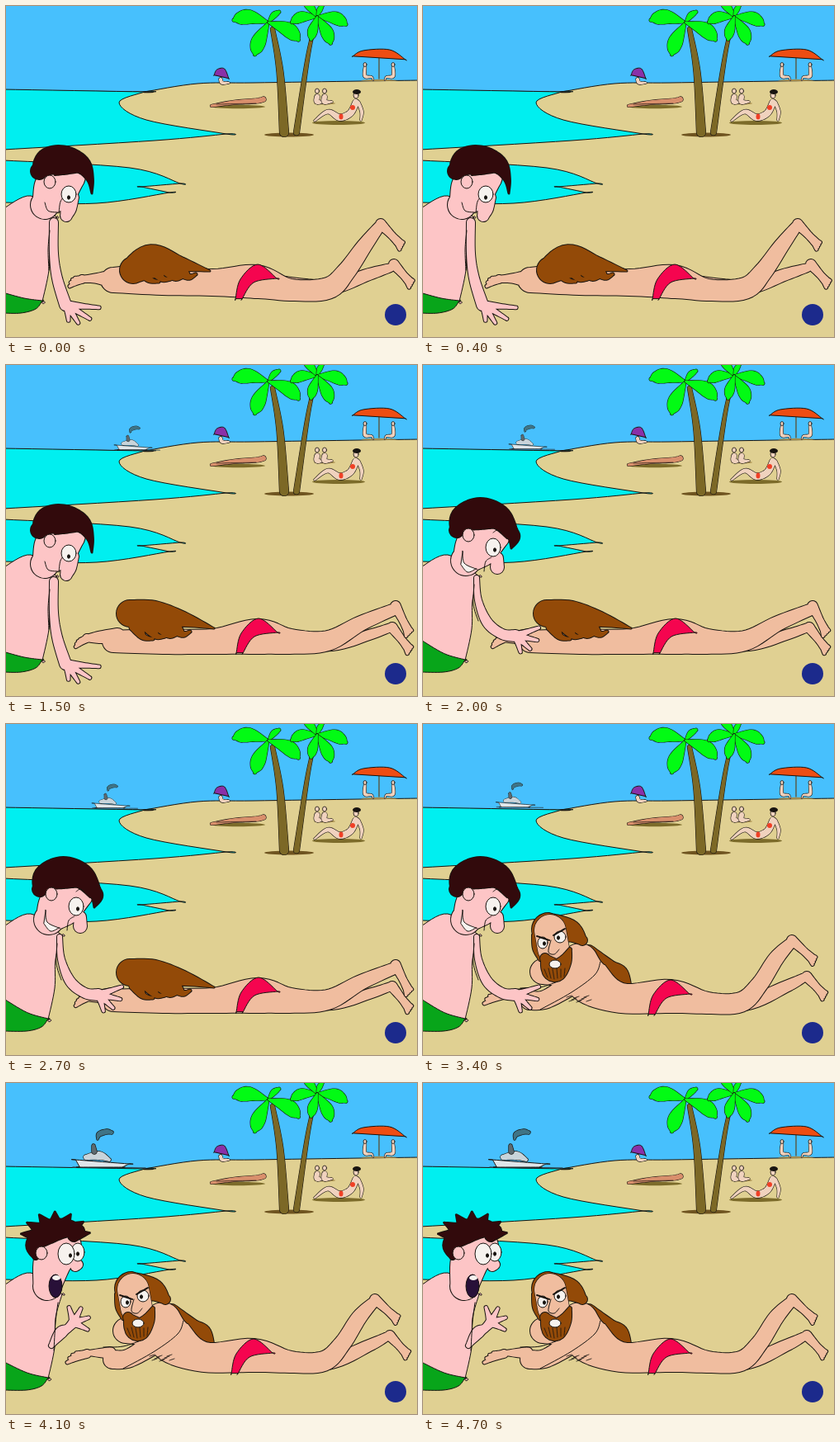
Write an HTML page that moves like this. It is 498 by 401 pixels and loops after 4800 ms.

```html
<!DOCTYPE html>
<html lang="en">
<head>
<meta charset="utf-8">
<title>Beach surprise</title>
<style>
  html, body { margin: 0; width: 100%; height: 100%; overflow: hidden; }
  svg { display: block; width: 100%; height: 100%; }
  path, ellipse { stroke: #181410; stroke-linejoin: round; stroke-linecap: round; }
</style>
</head>
<body>
<svg id="stage" viewBox="0 0 498 401" preserveAspectRatio="none"></svg>
<script>
const stage = document.getElementById('stage');
const SKIN = '#fdc5c6', TAN = '#f0bd9f', HAIR = '#934a08', DARK = '#320a0c', PALE = '#f0d2be';
const RED = '#f5054f', GREEN = '#08a51a', LEAF = '#02fb14', SAND = '#e0d092', SEA = '#00eff0';
const TRUNK = '#7c6826', TOWEL = '#7c6b2a';

function add(parent, tag, attrs = {}) {
  const el = document.createElementNS('http://www.w3.org/2000/svg', tag);
  for (const k in attrs) el.setAttribute(k, attrs[k]);
  return parent.appendChild(el);
}
const group = transform => add(stage, 'g', transform ? { transform } : {});
const range = n => [...Array(n).keys()];
const parse = text => text.trim().split(/\s+/).map(s => s.split(',').map(parseFloat));

// Point on a smooth curve through the key points
function spline(keys, i, t) {
  const at = n => keys[Math.max(0, Math.min(keys.length - 1, n))];
  const [a, b, c, d] = [-1, 0, 1, 2].map(n => at(i + n));
  return b.map((_, k) => b[k] + t * (c[k] - a[k] + t * (2 * a[k] - 5 * b[k] + 4 * c[k] - d[k]
    + t * (3 * b[k] - a[k] - 3 * c[k] + d[k]))) / 2);
}
function trace(keys, steps = 8) {
  const inner = range((keys.length - 1) * steps).map(n => spline(keys, Math.floor(n / steps), n % steps / steps));
  return [...inner, keys.at(-1)];
}

// Rounded tube along key points "x,y,radius"
function tube(text) {
  const p = trace(parse(text)), n = p.length - 1;
  const side = s => p.map(([x, y, r], i) => {
    const [ax, ay] = p[Math.max(i - 1, 0)], [bx, by] = p[Math.min(i + 1, n)];
    const h = s * Math.max(r, 0) / (Math.hypot(bx - ax, by - ay) || 1);
    return [x - (by - ay) * h, y + (bx - ax) * h];
  });
  const left = side(1), right = side(-1).reverse();
  const cap = (r, to) => `A${r} ${r} 0 0 0 ${to}`;
  return `M${left.join('L')}${cap(p[n][2], right[0])}L${right.join('L')}${cap(p[0][2], left[0])}Z`;
}

// Several tubes merged inside one outline
function blob(g, fill, tubes, width = 1) {
  const d = tubes.join('');
  add(g, 'path', { d, fill, 'stroke-width': width * 2 });
  add(g, 'path', { d, fill, style: 'stroke:none' });
}
// Area whose corners are marked with "!"
function area(g, fill, text) {
  const keys = text.trim().split(/\s+/).flatMap(s => s.endsWith('!') ? [s, s] : [s]);
  add(g, 'path', { d: `M${trace(parse(keys.join(' '))).join('L')}Z`, fill });
}
const line = (g, text, width = 1, color = '#181410') =>
  add(g, 'path', { d: 'M' + trace(parse(text)).join('L'), fill: 'none', style: `stroke:${color};stroke-width:${width}` });
const oval = (g, fill, cx, cy, rx, ry = rx, width = 1) =>
  add(g, 'ellipse', { cx, cy, rx, ry, fill, style: width ? `stroke-width:${width}` : 'stroke:none' });

// Local frame: along the given direction and across it
function frame(x, y, deg) {
  const c = Math.cos(deg * Math.PI / 180), s = Math.sin(deg * Math.PI / 180);
  return (u, v, r) => `${x + u * c - v * s},${y + u * s + v * c},${r}`;
}
function hand(x, y, deg, len, spread, drop = .17) {
  return range(4).map(i => {
    const f = frame(x, y, deg + spread * (i / 3 - .5)), reach = len * (1 - drop * i);
    return tube(`${f(0, 0, 5)} ${f(reach * .5, 0, 3)} ${f(reach, 0, 1.8)}`);
  });
}
function foot(x, y, deg, len) {
  const f = frame(x, y, deg);
  const toes = range(4).map(i => tube(`${f(len - 6, 3 - i * 2, 2)} ${f(len - i, 5 - i * 3, 1.8)}`));
  return [tube(`${f(0, 0, 6)} ${f(len * .5, 0, 4.5)} ${f(len - 7, 0, 5)}`), ...toes];
}
function leaf(x, y, deg, len) {
  const f = frame(x, y, deg), lift = Math.cos(deg * Math.PI / 180) * -len * .12;
  return tube(`${f(0, 0, 1)} ${f(len * .55, lift, len * .2)} ${f(len * .85, lift / 2, len * .17)} ${f(len, 0, 2)}`);
}
function eye(g, x, y, rx, ry, dx, dy) {
  oval(g, '#f6f2ee', x, y, rx, ry);
  oval(g, '#181410', x + dx, y + dy, 1.5, 2.2);
}

function drawCoast() {
  const g = group();
  add(g, 'path', { d: 'M-2-2H500V110H-2Z', fill: '#47c0fd' });
  area(g, SAND, '-3,102! 168,104! 232,94 300,93 430,91 502,90! 502,405! -3,405!');
  area(g, SEA, '-3,101! 168,104! 137,117 170,138 267,155! 180,163 -3,174!');
  area(g, SEA, '-3,187! 150,196 211,215! 164,219! 198,226! 110,239 -3,238!');
}

function drawPalms() {
  const g = group();
  oval(g, '#6f5420', 343, 156, 30, 2.5, 0);
  blob(g, TRUNK, [tube('323,28,2.5 332,80,4 337,153,5.5')], .6);
  blob(g, TRUNK, [tube('377,12,1.5 366,60,2.2 352,153,3.5')], .6);
  const fans = [
    [318, 20, [[184, 42], [113, 42], [-45, 18], [30, 42]]],
    [377, 13, [[168, 31], [-133, 22], [-65, 15], [15, 36], [63, 36], [105, 28]]]
  ];
  for (const [x, y, leaves] of fans)
    for (const [deg, len] of leaves) blob(g, LEAF, [leaf(x, y, deg, len)], .6);
}

function parasol(g, x, y, size, color) {
  line(g, `${x},${y} ${x},${y + size}`, 1.2, '#5d4420');
  area(g, color, `${x - size},${y + 5}! ${x - size * .6},${y - 2} ${x + size * .4},${y - 3} ${x + size},${y + 9}!`);
}

function drawBathers() {
  const g = group();
  oval(g, '#a08b50', 452, 90, 22, 1.2, 0);
  for (const side of [-1, 1]) {
    const x = 452 + side * 17;
    blob(g, PALE, [tube(`${x},74,1.5 ${x},85,2 ${x - side * 8},86,1 ${x - side * 10},90,.5`)], .6);
    oval(g, PALE, x, 71, 2, 2.5, .8);
  }
  parasol(g, 452, 56, 32, '#ee4d12');
  parasol(g, 261, 79, 9, '#8a30a8');
  blob(g, PALE, [tube('260,89,2 262,93,2 270,93,1')], .6);

  oval(g, TOWEL, 281, 122, 33, 2.2, 0);
  blob(g, '#d98f6c', [tube('249,121,1.5 275,117,2.5 303,115,3 312,113,3')], .6);
  line(g, '255,119 303,118', .7);

  oval(g, '#a88d4c', 386, 118, 13, 1.4, 0);
  for (const x of [377, 386]) {
    blob(g, PALE, [tube(`${x},110,3 ${x},116,3 ${x + 9},116,1`)], .6);
    oval(g, PALE, x, 103, 2.5, 3, .8);
  }

  oval(g, TOWEL, 403, 141.5, 32, 2.4, 0);
  blob(g, PALE, [tube('374,139,1 390,128,2.5 404,135,4 417,130,4 424,117,4'), tube('427,117,2 431,128,2 430,138,1')], .6);
  oval(g, '#f04026', 406, 134, 2.5, 3.5, 0);
  oval(g, '#f04026', 420, 123, 3, 3, 0);
  oval(g, PALE, 424, 108, 3, 4, .8);
  oval(g, '#181410', 425, 104, 5, 3, 0);
}

function boat(x, y, size) {
  const g = group(`translate(${x} ${y}) scale(${size})`);
  line(g, '-34,1 54,2', 1.4, '#2c4a58');
  area(g, '#dfe6ea', '-31,-8! 34,-3! 26,1! -26,1!');
  blob(g, '#c9d4da', [tube('-18,-11,3 -2,-13,5 10,-8,2')], .7);
  blob(g, '#5d6a70', [tube('-9,-25,2 -8,-18,3')], .7);
  blob(g, '#3f7486', [tube('-4,-33,1 -2,-39,3 7,-42,3 13,-41,2')], .7);
  return g;
}

function briefs(g, dx, dy) {
  const k = add(g, 'g', { transform: `translate(${dx} ${dy})` });
  area(k, RED, '278,355! 284,331 305,313 328,330! 300,335 286,355!');
}
function longHair(g, main, x, y) {
  const locks = range(4).map(i =>
    tube(`${x + 15 * i},${y},9 ${x + 8 + 16 * i},${y + 13 - i},4 ${x + 20 + 15 * i},${y + 16 - i * 3},1.5`));
  blob(g, HAIR, [tube(main), ...locks]);
}

function sleeper() {
  const g = group();
  blob(g, TAN, [tube('330,336,9 390,341,9 440,325,7 466,317,5'), ...foot(470, 313, 48, 33)]);
  blob(g, TAN, [
    tube('130,332,15 190,331,19 250,335,16 303,334,20 345,344,13 390,342,13 412,322,11 434,291,9 454,265,6'),
    tube('135,331,13 110,330,6 92,331,4'), ...hand(92, 331, 170, 17, 40), ...foot(454, 264, 46, 38)]);
  briefs(g, 0, 0);
  longHair(g, '154,320,16 178,309,20 212,313,9 247,321,.5', 165, 318);
  return g;
}

function stretched() {
  const g = group();
  blob(g, TAN, [tube('330,335,9 395,339,7 440,327,6 466,318,5'), ...foot(468, 318, 52, 36)]);
  blob(g, TAN, [
    tube('130,335,13 190,335,15 250,335,15 305,329,21 345,335,15 390,334,12 430,313,9 468,297,7'),
    tube('135,328,9 112,330,7 98,331,4'), ...hand(98, 331, 155, 17, 25), ...foot(472, 292, 63, 38)]);
  briefs(g, 1, -6);
  longHair(g, '150,301,16 180,302,16 215,308,9 252,319,.5', 158, 316);
  return g;
}

function bearded() {
  const g = group();
  blob(g, HAIR, [tube('200,278,10 225,297,11 240,303,9 252,318,.5')]);
  blob(g, TAN, [tube('325,335,9 390,338,9 440,318,7 462,307,5'), ...foot(465, 306, 47, 33)]);
  blob(g, TAN, [
    tube('190,288,22 202,312,27 240,332,18 300,330,20 345,338,13 385,337,12 408,315,10 428,284,9 447,264,6'),
    tube('145,300,15 190,298,22'), tube('185,312,13 150,333,11 129,335,11'),
    tube('126,327,7 100,327,3'), ...hand(98, 328, 170, 26, 28), ...foot(447, 262, 42, 38)]);
  briefs(g, -5, -3);
  line(g, '215,288 208,304 180,325 142,346');
  line(g, '118,320 142,319 166,311');
  for (const i of range(9)) {
    const x = 174 + i * 3, y = 331 + i * 5 % 7;
    line(g, `${x},${y} ${x + 6},${y - 2}`, .9);
  }
  blob(g, HAIR, [tube('152,249,20 178,251,14 193,262,6'), tube('134,256,2 136,272,3 142,285,2')]);
  blob(g, TAN, [tube('154,250,19 158,272,19')], .6);
  blob(g, HAIR, [tube('148,284,6 154,293,12 161,299,13 172,287,8 178,273,2')]);
  for (const i of range(6)) line(g, `${147 + i * 5},${297 - i % 2} ${151 + i * 4},${309 - Math.abs(i - 2)}`, .8);
  oval(g, '#f6f2ee', 160, 291, 7, 5);
  line(g, '155,262 152,276 159,279 165,273');
  eye(g, 145, 265, 6, 7, 2, 1);
  eye(g, 166, 258, 7, 7, -2, 1);
  line(g, '138,257 153,262', 2);
  line(g, '158,256 172,248', 2);
  return g;
}

// Back of the seated man; x is his front, tilt the slope of the waistband
function seated(g, x, tilt, arm) {
  const hip = x - 9, waist = 357 - tilt;
  area(g, SKIN, `-4,246! 30,230 ${x + 8},256! ${x},285 ${x - 1},320 ${hip},358! -4,362!`);
  blob(g, SKIN, arm);
  area(g, GREEN, `-4,${waist}! ${hip / 2},${waist + tilt * .7} ${hip},357! ${hip - 8},367 ${hip - 26},372 -4,372!`);
}
function head(g, face, nose, hair, earX, earY) {
  blob(g, SKIN, [tube(face), tube(nose)]);
  blob(g, DARK, hair);
  oval(g, SKIN, earX, earY, 7, 8);
}

function watcher() {
  const g = group();
  seated(g, 53, 10, [tube('58,262,5 58,300,5 62,330,6 72,362,7'), ...hand(74, 362, 45, 39, 80)]);
  line(g, '53,272 51,295 52,320');
  head(g, '72,205,24 58,225,26 47,241,17', '81,232,7 76,245,9 73,254,7',
    [tube('40,200,10 52,189,17 72,187,17 92,193,11 102,210,4 104,227,.5')], 53, 213);
  line(g, '64,251 66,237 72,229');
  line(g, '47,238 51,248 62,250');
  eye(g, 76, 228, 9, 10, 0, 4);
  return g;
}

function reacher() {
  const g = group();
  seated(g, 60, 25, [tube('65,258,3 67,285,4 78,312,6 96,326,6 112,328,7'), ...hand(113, 328, 28, 29, 95, .1)]);
  line(g, '62,266 61,290 67,310');
  head(g, '82,203,24 64,222,26 52,237,18', '90,234,7 90,245,8',
    [tube('41,200,9 49,186,16 70,180,19 92,185,15 106,202,9 110,210,7 107,222,.5')], 55, 206);
  area(g, '#f6f2ee', '48,226! 50,240 64,247! 54,251 46,242');
  line(g, '74,250 76,238 83,233');
  line(g, '85,203 90,200 95,203');
  eye(g, 85, 221, 9, 11, 2, 3);
  return g;
}

function shocked() {
  const g = group();
  seated(g, 60, 20, [tube('55,318,3 66,303,7 75,297,5 82,290,6'), ...hand(82, 290, -40, 19, 135, 0)]);
  line(g, '63,266 60,290 58,324');
  const spikes = range(7).map(i => {
    const a = (-172 + i * 27) * Math.PI / 180, tip = k => `${60 + 42 * k * Math.cos(a)},${187 + 31 * k * Math.sin(a)}`;
    return tube(`${tip(.55)},8 ${tip(1)},.5`);
  });
  head(g, '70,198,21 57,215,23 50,246,17', '84,222,6 87,220,6',
    [tube('36,210,4 33,196,9 50,181,14 72,176,11 88,179,7'), ...spikes], 43, 206);
  oval(g, '#281038', 60, 246, 8, 14);
  oval(g, '#f6f2ee', 61, 236, 5, 3, 0);
  eye(g, 87, 205, 8, 11, 0, 2);
  eye(g, 73, 207, 10, 13, 5, 2);
  return g;
}

drawCoast();
drawBathers();
drawPalms();

const farRight = boat(153, 102, .62), farMid = boat(126, 101, .62);
const farLeft = boat(111, 100, .64), near = boat(115, 101, 1);
const resting = sleeper(), turned = stretched(), angry = bearded();
const watching = watcher(), reaching = reacher(), scared = shocked();
oval(stage, '#1c2a8c', 472, 374, 13, 13, 0);

const LOOP = 4800;
const scenes = [
  [0, resting, watching],
  [1200, turned, watching, farRight],
  [1900, turned, reaching, farMid],
  [3400, angry, reaching, farLeft],
  [4100, angry, scared, near]
];
const actors = new Set(scenes.flatMap(s => s.slice(1)));

function show(time) {
  const scene = scenes.findLast(s => s[0] <= time % LOOP);
  for (const a of actors) a.style.display = scene.includes(a) ? '' : 'none';
}
const start = performance.now();
function tick() {
  show(performance.now() - start);
  requestAnimationFrame(tick);
}
tick();
</script>
</body>
</html>
```
